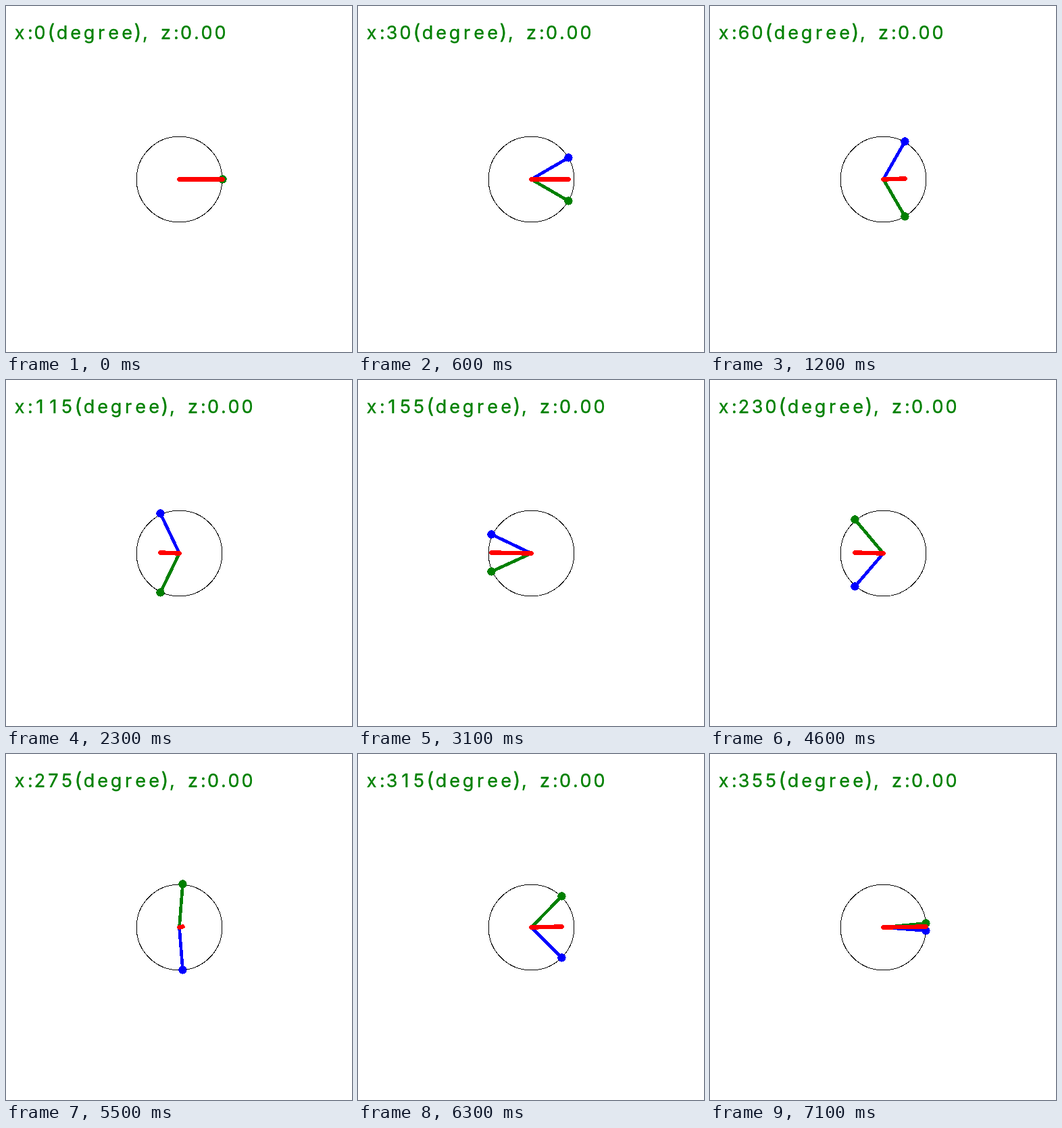
An HTML page that plays this animation: 512 by 512 pixels, repeating every 7200 ms.

```html
<!DOCTYPE html>
<html lang="en">
<head>
<meta charset="utf-8">
<style>
  html, body { margin: 0; width: 100%; height: 100%; overflow: hidden; background: #fff; }
  svg { display: block; width: 100%; height: 100%; }
  line { stroke-width: 4.7; stroke-linecap: round; }
  text { font: 27px Inter, sans-serif; fill: #008000; stroke: #008000; stroke-width: .4; text-anchor: middle; }
  .paren { font-size: 30px; }
  .sine { stroke: #00f; fill: #00f; }
  .mirror { stroke: #008000; fill: #008000; }
  .mean { stroke: #f00; stroke-width: 6.5; }
  .sine circle, .mirror circle { stroke: none; }
</style>
</head>
<body>
<svg viewBox="0 0 512 512">
  <text id="label" y="49.3">x:<tspan id="degrees">0</tspan><tspan class="paren">(</tspan>degree<tspan class="paren">)</tspan>, z:0.00</text>
  <g shape-rendering="crispEdges" transform="translate(.5 .5)">
    <circle cx="256" cy="256" r="63.4" fill="none" stroke="#000"/>
    <g class="sine"><line x1="256" y1="256"/><circle r="6.2"/></g>
    <g class="mirror"><line x1="256" y1="256"/><circle r="6.2"/></g>
    <line class="mean" x1="256" y1="256"/>
  </g>
</svg>
<script>
const CENTER = 256, RADIUS = 64, STEP_MS = 100, STEP_DEG = 5;
const find = selector => document.querySelector(selector);
const label = find('#label'), degrees = find('#degrees');
// Character centres after the number, for a one-digit number
const tail = [67, 83, 103, 123, 141, 159, 179, 195, 206, 220, 236.5, 252, 266.5, 282, 297, 317];

function setLine(line, x, y) {
  line.setAttribute('x2', x);
  line.setAttribute('y2', y);
}

function setHand(name, x, y) {
  const [line, dot] = find(name).children;
  setLine(line, x, y);
  dot.setAttribute('cx', x);
  dot.setAttribute('cy', y);
}

function draw(angle) {
  const rad = angle * Math.PI / 180;
  const x = Math.floor(CENTER + RADIUS * Math.cos(rad));
  const up = Math.floor(CENTER - RADIUS * Math.sin(rad));
  const down = Math.floor(CENTER + RADIUS * Math.sin(rad));
  setHand('.sine', x, up);
  setHand('.mirror', x, down);
  setLine(find('.mean'), x, Math.floor((up + down) / 2));

  const digits = [...String(angle)];
  const shift = 20 * (digits.length - 1);
  degrees.textContent = angle;
  label.setAttribute('x', [20, 36, ...digits.map((_, i) => 50 + 20 * i), ...tail.map(p => p + shift)].join(' '));
}

const start = performance.now();
let shown = -1;
function tick() {
  const angle = Math.floor((performance.now() - start) / STEP_MS) * STEP_DEG % 360;
  if (angle !== shown) draw(shown = angle);
  requestAnimationFrame(tick);
}
tick();
</script>
</body>
</html>
```
